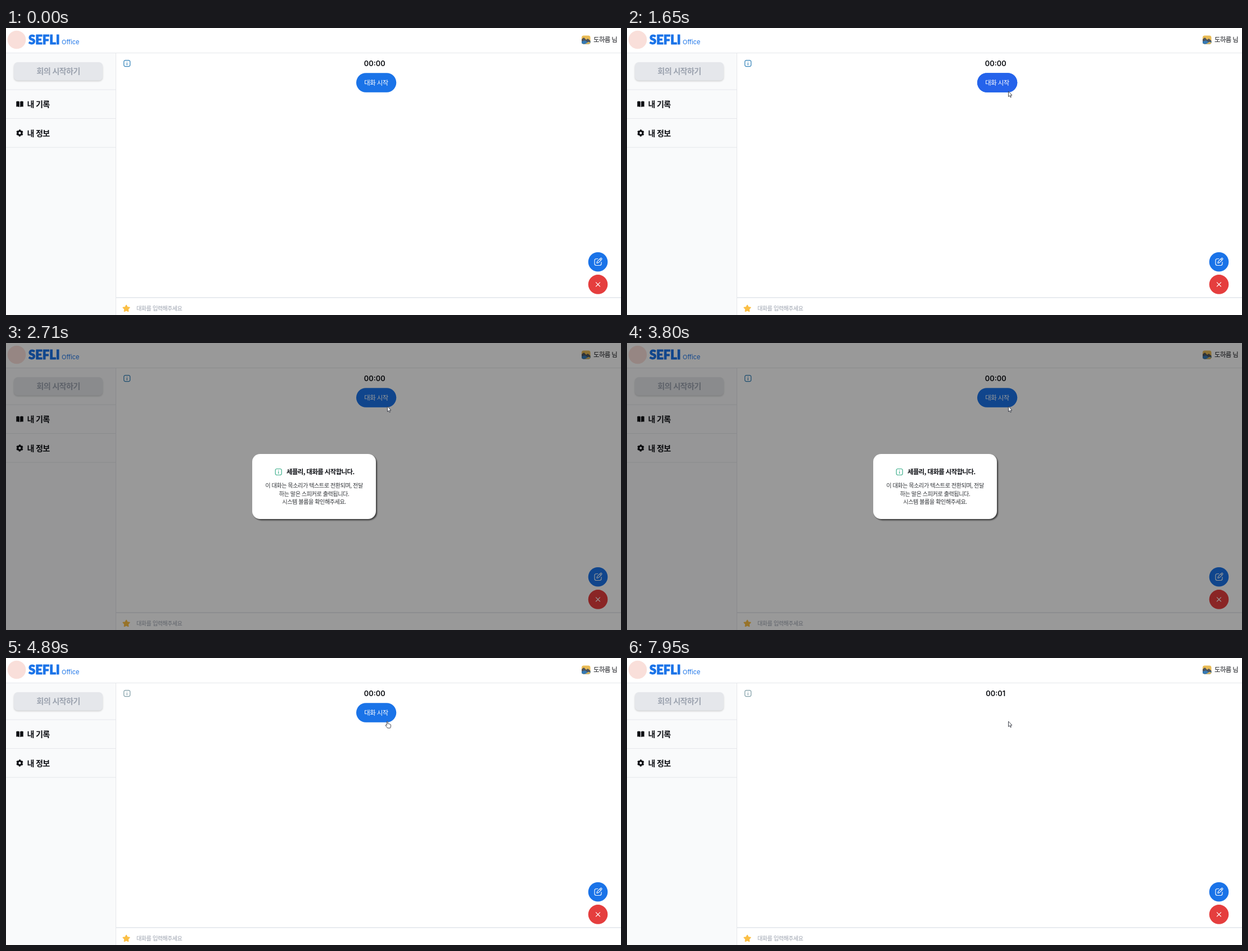
Write an HTML page that moves like this. It is 1094x512 px and loops after 8 s.

```html
<!DOCTYPE html>
<html lang="ko">
<head>
<meta charset="utf-8">
<title>Office</title>
<style>
html, body { margin: 0; width: 100%; height: 100%; overflow: hidden; }
svg {
  display: block; width: 100vw; height: 100vh;
  --line: #e5e7eb; --muted: #9ca3af; --blue: #1a73e8; --red: #e53e3e; --gold: #fbbf45; --info: #2f80b8;
}
svg.started { --info: #7d9ca5; }
text { font-family: Inter, "Noto Sans CJK KR", "Noto Sans CJK", sans-serif; fill: #0b0d12; }
.ko { font-family: "Noto Sans CJK KR", "Noto Sans CJK", sans-serif; letter-spacing: -.05em; }
.mid { text-anchor: middle; }
.bold { font-weight: 700; }
.stroke { fill: none; stroke-linecap: round; stroke-linejoin: round; }
.pointer { fill: #fff; stroke: #30343f; stroke-width: .9; stroke-linejoin: round; }
</style>
</head>
<body>
<svg id="stage" viewBox="0 0 1094 512" preserveAspectRatio="none">
  <defs>
    <g id="infoIcon" class="stroke" stroke-width="1.2">
      <rect x="-5.5" y="-5.5" width="11" height="11" rx="2.6"/>
      <path d="M0-.6V2.8M0-2.8V-2.7"/>
    </g>
    <filter id="soft" x="-10%" y="-20%" width="120%" height="150%"><feGaussianBlur stdDeviation="1.8"/></filter>
    <filter id="tight" x="-5%" y="-5%" width="110%" height="110%"><feGaussianBlur stdDeviation=".8"/></filter>
    <clipPath id="photoClip"><rect x="1024" y="13.5" width="15.5" height="15" rx="3.5"/></clipPath>
  </defs>

  <rect width="1094" height="512" fill="#fff"/>
  <rect y="45" width="195" height="467" fill="#f9fafb"/>
  <path d="M0 44.5H1094M195.5 45V512M0 110H195M0 161.5H195M0 213H195" stroke="var(--line)"/>
  <path d="M196 481H1094" stroke="#e0e5ea" stroke-width="1.7"/>

  <!-- Header -->
  <circle cx="19" cy="21" r="16.3" fill="#f9dfda"/>
  <text x="40" y="29" font-size="22" font-weight="900" style="font-family:Lato,sans-serif;fill:var(--blue);stroke:var(--blue);stroke-width:.9">SEFLI</text>
  <text x="99" y="29" font-size="11" style="fill:var(--blue)">Office</text>
  <g clip-path="url(#photoClip)">
    <rect x="1024" y="13" width="16" height="16" fill="#e9bb55"/>
    <path d="M1024 20l4-3 4 4 3-2 5 4v6h-16z" fill="#50545a"/>
    <path d="M1024 24l6-2 4 3 6-1v5h-16z" fill="#3479b5"/>
    <path d="M1029 29l7-4 4 1v3z" fill="#e9bb55"/>
  </g>
  <text class="ko" x="1045" y="25" font-size="11.4">도하름 님</text>

  <!-- Sidebar -->
  <rect x="14" y="63" width="158" height="32" rx="7" fill="#000" opacity=".17" filter="url(#soft)"/>
  <rect x="14" y="61" width="158" height="32.5" rx="7" fill="var(--line)"/>
  <text class="ko mid bold" x="93" y="81.8" font-size="14.2" style="fill:var(--muted)">회의 시작하기</text>
  <path d="M18.3 131q3.2-1.2 5.6.3v9.7q-2.6-1.2-5.6-.6zM30.7 131q-3.2-1.2-5.6.3v9.7q2.6-1.2 5.6-.6z" fill="#0b0d12"/>
  <text class="ko bold" x="37.5" y="140.8" font-size="14.1">내 기록</text>
  <g transform="translate(24.4 187.4) rotate(15)" fill="none" stroke="#0b0d12">
    <circle r="3.6" stroke-width="3"/>
    <circle r="5.2" stroke-width="2" pathLength="12" stroke-dasharray="1.1 .9"/>
  </g>
  <text class="ko bold" x="37.5" y="192.5" font-size="14.1">내 정보</text>

  <!-- Conversation -->
  <use href="#infoIcon" x="215.2" y="63.2" stroke="var(--info)"/>
  <text id="timer" class="mid" x="655.7" y="68" font-size="12.8" font-weight="600">00:00</text>
  <g id="startButton">
    <rect x="623" y="80.3" width="71.3" height="34.4" rx="17.2" fill="var(--blue)"/>
    <rect id="hover" x="623" y="80.3" width="71.3" height="34.4" rx="17.2" fill="#2563eb"/>
    <text class="ko mid" x="658.5" y="101.7" font-size="11.4" font-weight="500" style="fill:#fff">대화 시작</text>
  </g>
  <circle cx="1053" cy="417.3" r="17.3" fill="var(--blue)"/>
  <circle cx="1053" cy="457.4" r="17.3" fill="var(--red)"/>
  <g class="stroke" stroke="#fff" stroke-width="1.1">
    <path d="M1053 411.8h-3q-3 0-3 3v5.7q0 3 3 3h6q3 0 3-3v-3"/>
    <path d="M1051 419.5l.6-2.8 6-6q1.1-.8 2 .1t.1 2l-6 6zM1056.3 412l2.2 2.2"/>
    <path d="M1049.4 453.8l7.2 7.2m0-7.2l-7.2 7.2"/>
  </g>
  <path d="M214 494.6l1.8 3.5 3.9.6-2.8 2.8.6 3.9-3.5-1.8-3.5 1.8.6-3.9-2.8-2.8 3.9-.6z"
    fill="var(--gold)" stroke="var(--gold)" stroke-width="1.8" stroke-linejoin="round"/>
  <text class="ko" x="232" y="504" font-size="10.1" style="fill:var(--muted)">대화를 입력해주세요</text>

  <!-- Dialog -->
  <g id="dialog">
    <rect width="1094" height="512" opacity=".4"/>
    <rect x="440" y="200.2" width="220" height="116" rx="14" opacity=".6" filter="url(#tight)"/>
    <rect x="438" y="198" width="220" height="116" rx="14" fill="#fff"/>
    <use href="#infoIcon" x="484.7" y="230" stroke="#3fb08d"/>
    <text class="ko bold" x="499" y="234.2" font-size="11.4">세플리, 대화를 시작합니다.</text>
    <g class="mid" font-size="10.2">
      <text class="ko" x="548" y="258.4" style="fill:#33363a">이 대화는 목소리가 텍스트로 전환되며, 전달</text>
      <text class="ko" x="548" y="272.8" style="fill:#33363a">하는 말은 스피커로 출력됩니다.</text>
      <text class="ko" x="548" y="287.2" style="fill:#33363a">시스템 볼륨을 확인해주세요.</text>
    </g>
  </g>

  <g id="cursor">
    <path id="arrow" class="pointer" d="M.5.3V9.8L2.6 7.9 4.1 11.1 5.5 10.5 4.1 7.3H7Z"/>
    <path id="hand" class="pointer" d="M-.6 7.5V1.1Q-.6.2.3.2t.9.9V4.4Q2.6 3.8 3 5 4.4 4.4 4.8 5.6 6.4 5.3 6.5 6.8V9.2Q6.5 10.6 5.4 12.3H.7Q-.3 10.7-2.7 8.1-3.3 7.1-2.5 6.6-1.5 6.3-.6 7.5Z"/>
  </g>
</svg>
<script>
const DURATION = 8000;
const ENTER = 350, ARRIVE = 1250, OPEN = 1690, CLOSE = 4890, START = 6200, FIRST_SECOND = 7220;
const HOVER_FADE = 150;
const get = id => document.getElementById(id);
const [stage, timer, startButton, hover, dialog, cursor, arrow, hand] =
  ["stage", "timer", "startButton", "hover", "dialog", "cursor", "arrow", "hand"].map(get);

const progress = (t, from, length) => Math.min(1, Math.max(0, (t - from) / length));
const ease = p => p * p * (3 - 2 * p);
const mix = (a, b, p) => a + (b - a) * p;
const show = (element, visible) => { element.style.display = visible ? "" : "none"; };

function draw(t) {
  const open = t >= OPEN && t < CLOSE;
  stage.classList.toggle("started", t >= CLOSE);
  show(dialog, open);
  show(startButton, t < START);
  hover.style.opacity = open ? 0 : progress(t, t < OPEN ? ARRIVE : CLOSE, HOVER_FADE);
  timer.textContent = t < FIRST_SECOND ? "00:00" : "00:01";

  const p = ease(progress(t, ENTER, ARRIVE - ENTER));
  cursor.setAttribute("transform", `translate(${mix(922, 678, p)} ${mix(506, 112.7, p)})`);
  show(cursor, t >= ENTER);
  const pointing = t >= CLOSE && t < START;
  show(hand, pointing);
  show(arrow, !pointing);
}

function tick() {
  draw(performance.now() % DURATION);
  requestAnimationFrame(tick);
}
tick();
</script>
</body>
</html>
```
